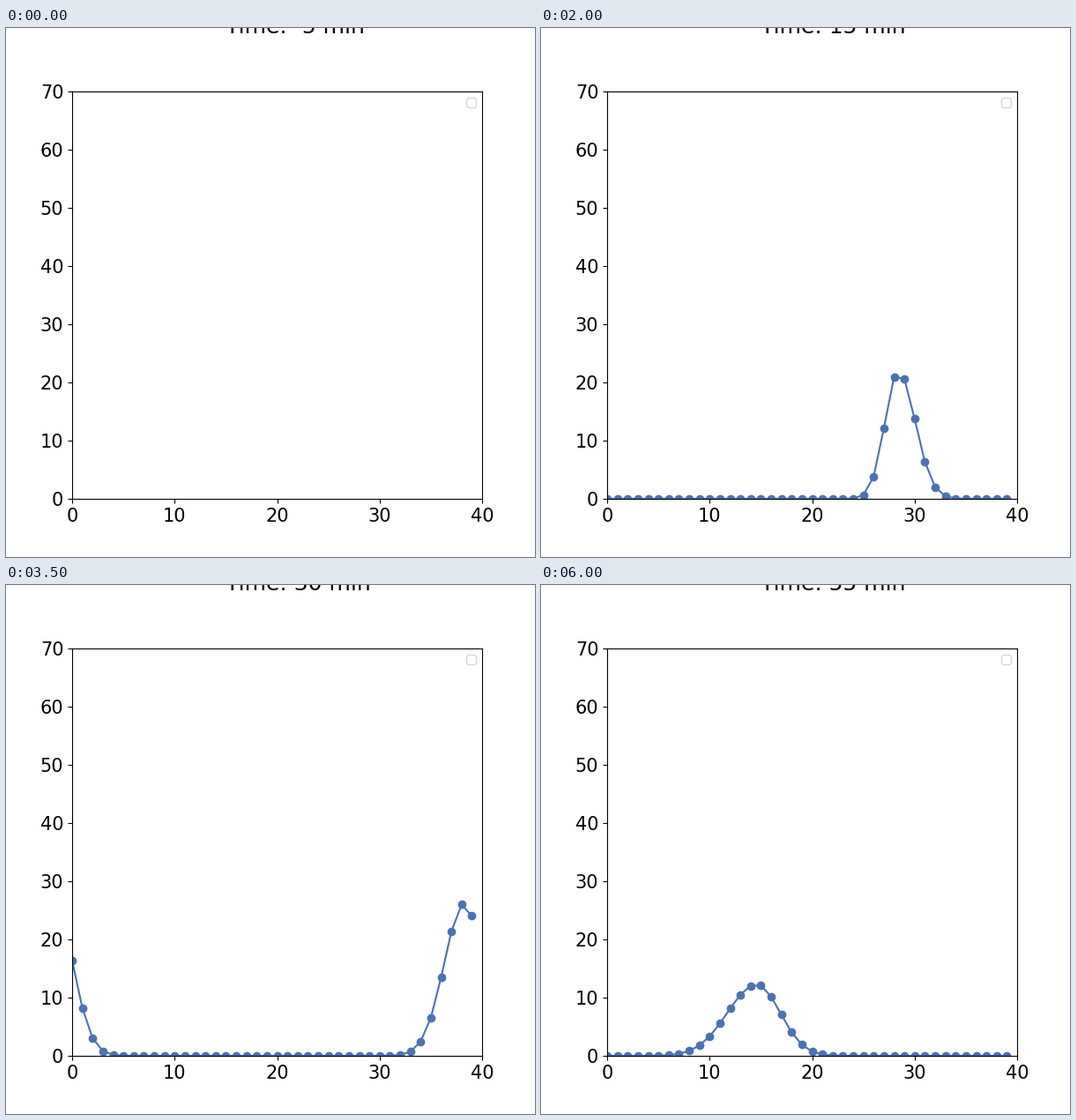
These frames come from a looping animation (600x600 px, 6500 ms). A matplotlib script:

```python
import numpy as np
import matplotlib.pyplot as plt
from matplotlib.animation import FuncAnimation

plt.rcParams["font.family"] = "DejaVu Sans"

BINS = 40
STEP = 5  # minutes per frame
FRAMES = 13

# The pulse at key minutes: its peak, height, and rear and front spread.
MINUTE = [0, 5, 10, 20, 25, 35, 45, 55]
PEAK = [20, 23.6, 25.2, 31.6, 35.6, 40.9, 47.6, 54.6]
HEIGHT = [0.001, 0.6, 7.3, 66.5, 43.2, 15.9, 8.9, 12.3]
REAR = [0.5, 0.5, 0.76, 1.8, 2.17, 1.73, 1.68, 2.85]
FRONT = [0.5, 0.5, 1.1, 2.2, 1.81, 1.8, 2.0, 2.28]

bins = np.arange(BINS)


def pulse(minute):
    """Lopsided bell that travels round the ring of bins."""
    peak, rear, front = (np.interp(minute, MINUTE, key)
                         for key in (PEAK, REAR, FRONT))
    height = np.exp(np.interp(minute, MINUTE, np.log(HEIGHT)))
    offset = (bins - peak + BINS / 2) % BINS - BINS / 2
    spread = np.where(offset < 0, rear, front)
    return height * np.exp(-(offset / spread) ** 2 / 2)


fig, ax = plt.subplots(figsize=(6, 6), dpi=100)
ax.set_xlim(0, 40)
ax.set_ylim(0, 70)
ax.tick_params(labelsize=15)
ax.legend([], [], loc="upper right")
line, = ax.plot([], [], "o-", color="#4C72B0")
clock = ax.text(15, 80, "", fontsize=18)


def update(i):
    minute = STEP * (i - 1)
    clock.set_text(f"Time: {minute} min")
    if minute < 0:
        line.set_data([], [])
    else:
        line.set_data(bins, pulse(minute))
    return line, clock


anim = FuncAnimation(fig, update, frames=FRAMES, interval=500,
                     repeat=True, repeat_delay=0)
plt.show()
```
